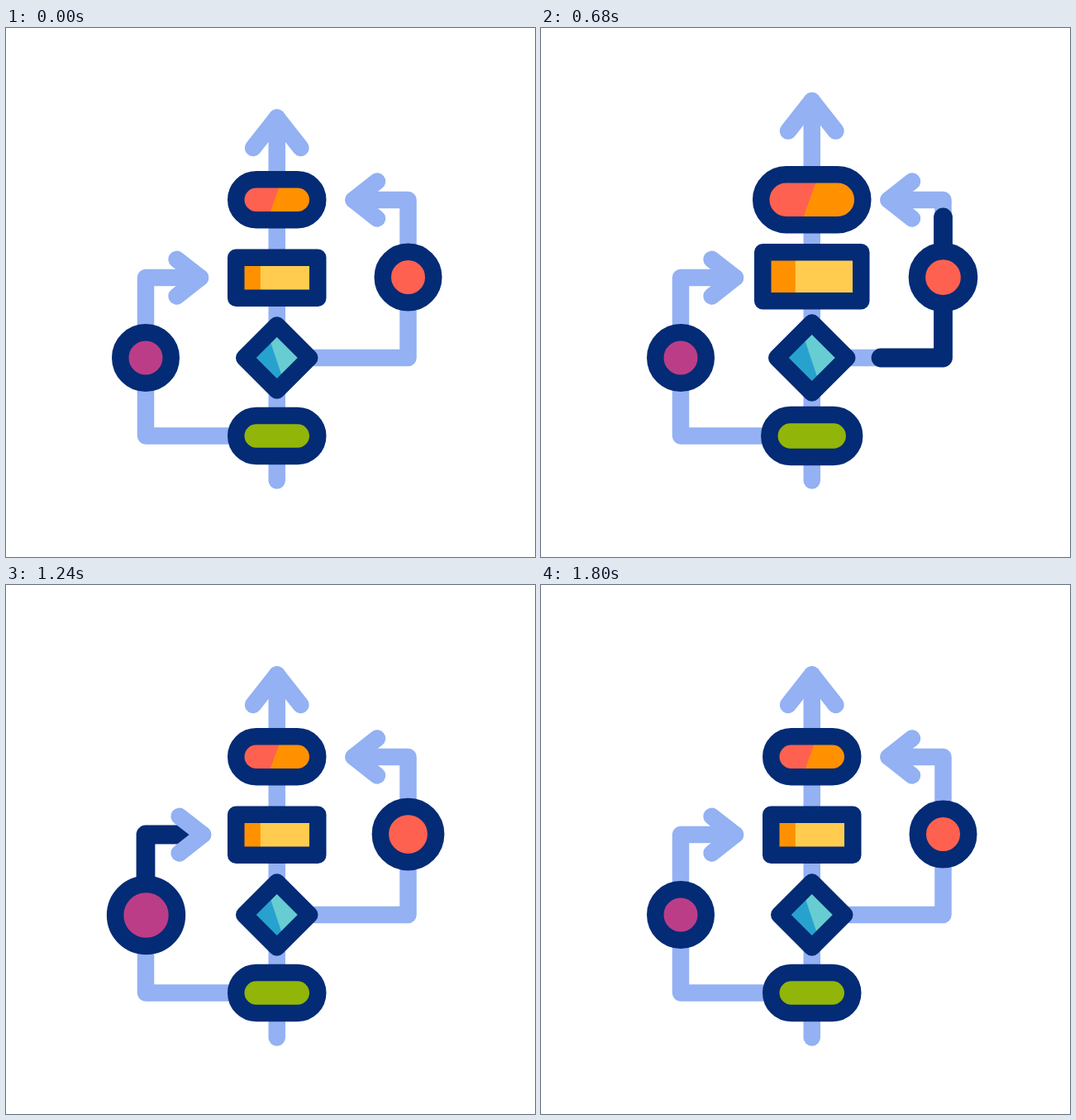
Recreate the animation shown at these times as an HTML page with a canvas. Size 640x640 px, loop 2.12 s.

```html
<!DOCTYPE html>
<html lang="en">
<head>
<meta charset="utf-8">
<title>Flowchart</title>
<style>
html, body { margin: 0; width: 100%; height: 100%; overflow: hidden; background: #fff; }
canvas { display: block; }
</style>
</head>
<body>
<canvas id="stage" width="640" height="640"></canvas>
<script>
const ctx = document.getElementById('stage').getContext('2d');
const LOOP = 2120, STEP = 20;
const NAVY = '#042b75', LIGHT = '#93b1f3';
const RED = '#ff6150', ORANGE = '#ff9100';
const CX = 327.75;

// Eased progress from 0 to 1
function ease(t, start, duration) {
  const p = Math.min(1, Math.max(0, (t - start) / duration));
  return p * p * (3 - 2 * p);
}

// Rise to 1 and fall back, each taking half
const pulse = (t, start, half) =>
  ease(t, start, half) - ease(t, start + half, half);

function trace(points) {
  ctx.beginPath();
  points.forEach(([x, y]) => ctx.lineTo(x, y));
}

function line(points, color, width) {
  trace(points);
  ctx.strokeStyle = color;
  ctx.lineWidth = width;
  ctx.stroke();
}

// Connectors: route of the dark signal, arrowhead, head travel, start time
const links = [
  { route: [[CX, 547.5], [CX, 111]],
    head: [[299, 145], [CX, 108.5], [356.5, 145]], move: [0, -31.5], start: 0 },
  { route: [[373.5, 399], [486.5, 399], [486.5, 208], [429.5, 208]],
    head: [[449, 185.5], [420.5, 208], [449, 230.5]], move: [-30, 0], start: 400 },
  { route: [[273, 493.5], [169, 493.5], [169, 302], [225, 302]],
    head: [[206.5, 279.8], [235, 302], [206.5, 324.5]], move: [30, 0], start: 800 }
];

function drawLink({ route, head, move, start }, t) {
  const k = pulse(t, start + 400, 200);
  const tips = head.map(([x, y]) => [x + move[0] * k, y + move[1] * k]);
  line([...route, tips[1]], LIGHT, 20.5);

  const length = route.slice(1).reduce((sum, [x, y], i) =>
    sum + Math.hypot(x - route[i][0], y - route[i][1]), 0);
  const front = length * ease(t, start, 400);
  const back = length * ease(t, start + 200, 400);
  if (front - back > 0.01) {
    ctx.setLineDash([front - back, 9999]);
    ctx.lineDashOffset = -back;
    line(route, NAVY, 22.8);
    ctx.setLineDash([]);
  }
  line(tips, LIGHT, 20.5);
}

const pill = () => ctx.roundRect(-49.5, -24.5, 99, 49, 24.5);
const box = () => ctx.rect(-49.5, -24.5, 99, 49);
const disc = () => ctx.arc(0, 0, 30.75, 0, 7);
function diamond() {
  ctx.moveTo(0, -39.5);
  ctx.lineTo(39.5, 0);
  ctx.lineTo(0, 39.5);
  ctx.lineTo(-39.5, 0);
  ctx.closePath();
}

// split: x of the colour border at 50 above and 50 below the centre
const nodes = [
  { x: CX, y: 207.75, shape: pill, grow: 0.245, start: 300,
    fill: ORANGE, side: RED, split: [342.9, 307.2] },
  { x: CX, y: 302.25, shape: box, grow: 0.204, start: 300, shift: [0, -1.5],
    fill: '#ffcc50', side: ORANGE, split: [307.8, 307.8] },
  { x: CX, y: 399, shape: diamond, grow: 0.133, start: 100,
    fill: '#67cdd2', side: '#27a2ce', split: [309.6, 343.2] },
  { x: CX, y: 493.5, shape: pill, grow: 0.18, start: 0, fill: '#91b508' },
  { x: 486.5, y: 301.6, shape: disc, grow: 0.265, start: 600, fill: RED },
  { x: 169, y: 399, shape: disc, grow: 0.335, start: 1000, shift: [0.8, 0.8],
    fill: '#bc3d87' }
];

function drawNode({ x, y, shape, grow, start, shift = [0, 0], fill, side, split }, t) {
  const k = pulse(t, start, 400);
  const outline = () => {
    ctx.save();
    ctx.translate(x + shift[0] * k, y + shift[1] * k);
    ctx.scale(1 + grow * k, 1 + grow * k);
    ctx.beginPath();
    shape();
    ctx.restore();
  };
  outline();
  ctx.fillStyle = fill;
  ctx.fill();
  if (side) {
    ctx.save();
    ctx.clip();
    trace([[200, y - 50], [split[0], y - 50], [split[1], y + 50], [200, y + 50]]);
    ctx.fillStyle = side;
    ctx.fill();
    ctx.restore();
    outline();
  }
  ctx.strokeStyle = NAVY;
  ctx.lineWidth = 20.5;
  ctx.stroke();
}

function draw(t) {
  ctx.fillStyle = '#fff';
  ctx.fillRect(0, 0, 640, 640);
  ctx.lineCap = ctx.lineJoin = 'round';
  links.forEach(link => drawLink(link, t));
  nodes.forEach(node => drawNode(node, t));
}

let origin;
function tick(now) {
  origin ??= now;
  const t = (now - origin) % LOOP;
  draw(Math.floor(t / STEP) * STEP);
  requestAnimationFrame(tick);
}
draw(0);
requestAnimationFrame(tick);
</script>
</body>
</html>
```
